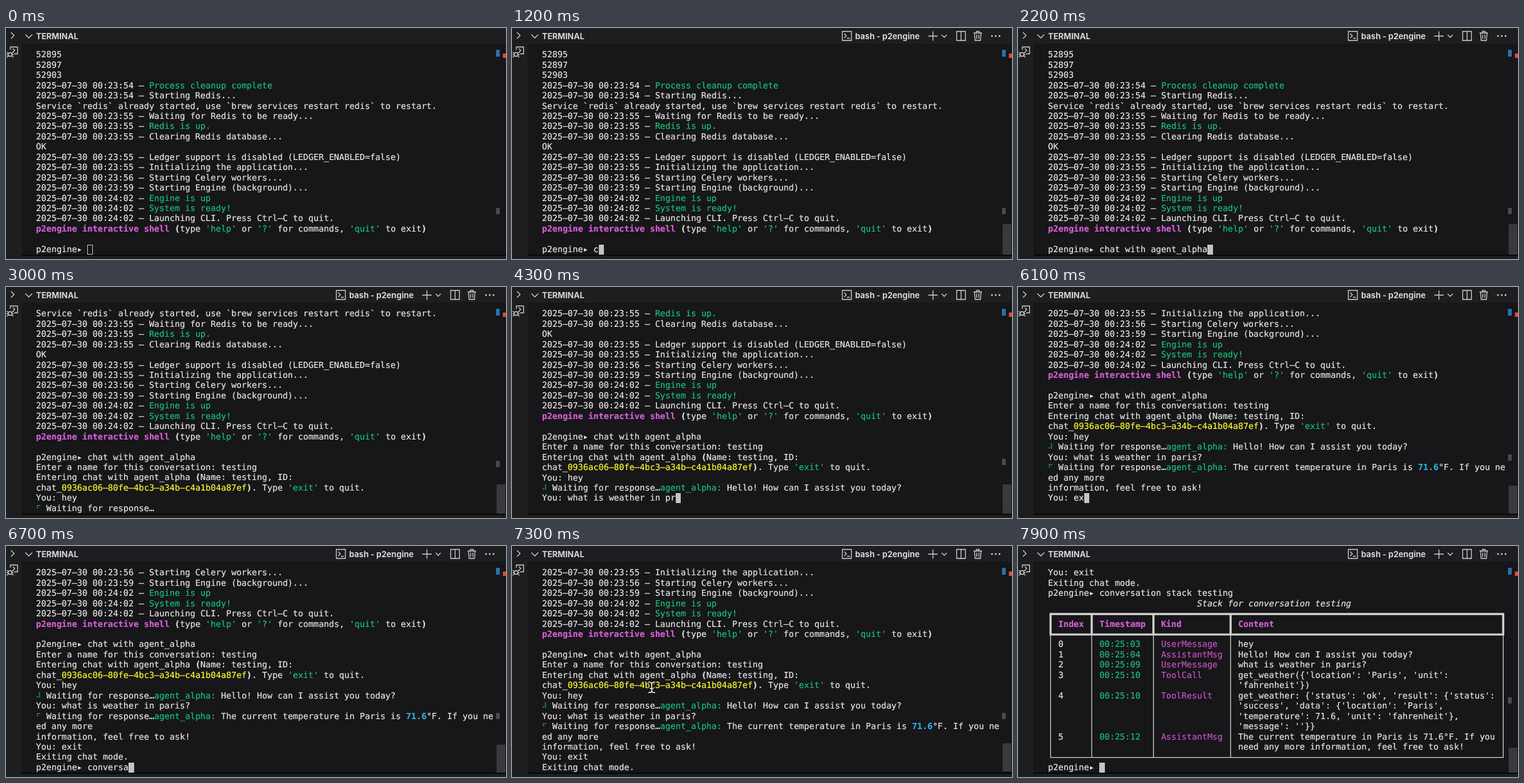
Write an HTML page that moves like this. It is 800x371 px and loops after 8000 ms.

```html
<!DOCTYPE html>
<html lang="en">
<head>
<meta charset="utf-8">
<title>Terminal session</title>
<style>
html, body { margin: 0; width: 100%; height: 100%; overflow: hidden; background: #1e1d1f; }
#stage { position: relative; width: 800px; height: 371px; overflow: hidden; background: #1e1d1f; }
#stage > * { position: absolute; }
#pane { left: 25px; top: 25px; width: 775px; height: 339px; background: #171618; }
#foot { left: 25px; top: 364px; width: 775px; height: 2px; background: #080808; }
#chrome { left: 0; top: 0; }
.label { top: 3px; height: 20px; white-space: pre; color: #d6d6d6;
  font: 700 13px/20px Inter, "Open Sans", sans-serif; }
#view { left: 0; top: 35.3px; width: 784px; height: 329px; overflow: hidden; }
#text { position: absolute; left: 48px; top: 0; color: #e6e6e6;
  font: 13.67px/16.45px "DejaVu Sans Mono", "Liberation Mono", monospace;
  text-rendering: geometricPrecision; font-variant-ligatures: none; -webkit-text-stroke: .2px; }
#text > * { position: absolute; left: 0; white-space: pre; }
.g { color: #16c07a; }
.m { color: #c64fc6; }
.y { color: #fafa2c; }
.c { color: #2bb0dc; font-weight: 700; }
b.m { color: #d45fd6; }
.spin { position: absolute; left: 0; top: 0; font: 11px/16.45px "DejaVu Sans", sans-serif; color: #16c07a; }
#cursor { box-sizing: border-box; width: 8.4px; height: 16px; border: 1px solid #c4c4c4; }
#thumb { left: 785px; width: 14px; background: #3a393b; }
.mark { left: 784px; width: 6px; }
</style>
</head>
<body>
<div id="stage">
  <div id="pane"></div>
  <div id="foot"></div>
  <svg id="chrome" width="800" height="50" fill="none" stroke="#cfcfcf" stroke-width="1.3">
    <path d="M8 7l5 5-5 5M31 10.5l5.500 5.500 5.500-5.500"/>
    <path d="M7 35V30.500H18.500V41.500H13M11 33l3 3-3 3"/>
    <circle cx="6.500" cy="42.500" r="3"/>
    <path d="M1 39l3 2M1 43h2.500M1 47l3-2M12 39l-3 2M12 43H9.500M12 47l-3-2"/>
    <g id="tools">
      <path d="M528.500 5.500h14.500v14.500h-14.500zM531.500 9l3.500 3.500-3.500 3.500M536 16.500h4.500"/>
      <path d="M673.500 5.500v15M666 13h15M687.500 11l4 4 4-4"/>
      <path d="M711.500 5.500h14v14.500h-14zM718.500 5.500v14.500"/>
      <path d="M738.500 8h13.500M743 8V5.500h4.500V8M740 8l1 12h8.500l1-12M743.500 10.500v7M747 10.500v7"/>
      <g fill="#cfcfcf" stroke="none"><circle cx="768" cy="13" r="1.400"/><circle cx="774" cy="13" r="1.400"/><circle cx="780" cy="13" r="1.400"/></g>
    </g>
  </svg>
  <div class="label" style="left:48px">TERMINAL</div>
  <div class="label" id="shell" style="left:549px">bash - p2engine</div>
  <div id="view"><div id="text"></div></div>
  <div id="thumb"></div>
  <div class="mark" style="top:35px;height:11px;background:#2274ae"></div>
  <div class="mark" id="mark" style="height:10px;background:#4b4a4c"></div>
  <div style="left:795px;top:41px;width:5px;height:7px;background:#e2483c"></div>
  <svg id="mouse" style="left:216px;top:216px" width="15" height="22" fill="none" stroke-linecap="round">
    <defs><path id="beam" d="M2.500 2.500q5 0 5 3v11q0 3-5 3M12.500 2.500q-5 0-5 3v11q0 3 5 3M5 13h5"/></defs>
    <use href="#beam" stroke="#111" stroke-width="3.600"/>
    <use href="#beam" stroke="#ececec" stroke-width="1.700"/>
  </svg>
</div>
<script>
const LOOP = 8000, ROW = 16.45, COL = 8.23, ROWS = 20, VIEW = ROWS * ROW;
const HISTORY = 114, MARK_LINE = 105.4;
const $ = id => document.getElementById(id);
const tag = (cls, s, el = 'span') => `<${el} class="${cls}">${s}</${el}>`;
const g = s => tag('g', s), m = s => tag('m', s), mb = s => tag('m', s, 'b');
const log = (time, s) => `2025-07-30 00:${time} - ${s}`;
const PROMPT = 'p2engine▸ ';

const lines = [];
const put = (at, ...list) => list.forEach(html => lines.push({ at, html }));
// keys: [start, ms per key, text already there, text being typed]
const input = (at, until, html, ...keys) => lines.push({ at, until, html, keys });
const wait = (at, done, phase, reply) => lines.push({ at, done, phase, reply });

put(0, '52895', '52897', '52903',
  log('23:54', g('Process cleanup complete')),
  log('23:54', 'Starting Redis...'),
  'Service `redis` already started, use `brew services restart redis` to restart.',
  log('23:55', 'Waiting for Redis to be ready...'),
  log('23:55', g('Redis is up.')),
  log('23:55', 'Clearing Redis database...'),
  'OK',
  log('23:55', 'Ledger support is disabled (LEDGER_ENABLED=false)'),
  log('23:55', 'Initializing the application...'),
  log('23:56', 'Starting Celery workers...'),
  log('23:59', 'Starting Engine (background)...'),
  log('24:02', g('Engine is up')),
  log('24:02', g('System is ready!')),
  log('24:02', 'Launching CLI. Press Ctrl-C to quit.'),
  `${mb('p2engine interactive shell')} <b>(</b>type ${g("'help'")} or ${g("'?'")} for commands, ${g("'quit'")} to exit<b>)</b>`,
  '');
input(0, 2300, PROMPT, [1200, 45, '', 'chat with agent_alpha']);
input(2300, 2660, 'Enter a name for this conversation: ', [2360, 40, '', 'testing']);
put(2660, 'Entering chat with agent_alpha <b>(</b>Name: testing, ID:',
  `chat_${tag('y', '0936ac06-80fe-4bc3-a34b-c4a1b04a87ef')}<b>)</b>. Type ${g("'exit'")} to quit.`);
input(2660, 2880, 'You: ', [2720, 50, '', 'hey']);
wait(2880, 3120, 3000, 'Hello! How can I assist you today?');
input(3120, 4600, 'You: ',
  [3170, 54, '', 'what is weather in pr'],
  [4340, 40, 'what is weather in p', ''],
  [4380, 38, 'what is weather in p', 'aris?']);
wait(4600, 5400, 5400, `The current temperature in Paris is ${tag('c', '71.6')}°F. If you ne`);
put(5400, 'ed any more', 'information, feel free to ask!');
input(5400, 6260, 'You: ', [6060, 35, '', 'exit']);
put(6260, 'Exiting chat mode.');
input(6260, 7850, PROMPT,
  [6420, 38, '', 'conversation stack'],
  [7450, 40, 'conversation stack', ' testing']);

const cells = (i, time, kind, content) =>
  '  ' + i.padEnd(8) + g(time.padEnd(12)) + m(kind.padEnd(15)) + content;
const more = s => ' '.repeat(37) + s;
put(7850, ' '.repeat(29) + '<i>Stack for conversation testing</i>');
const tableLine = lines.length;
put(7850, '',
  mb('  Index   Timestamp   Kind           Content'),
  '',
  cells('0', '00:25:03', 'UserMessage', 'hey'),
  cells('1', '00:25:04', 'AssistantMsg', 'Hello! How can I assist you today?'),
  cells('2', '00:25:09', 'UserMessage', 'what is weather in paris?'),
  cells('3', '00:25:10', 'ToolCall', "get_weather({'location': 'Paris', 'unit':"),
  more("'fahrenheit'})"),
  cells('4', '00:25:10', 'ToolResult', "get_weather: {'status': 'ok', 'result': {'status':"),
  more("'success', 'data': {'location': 'Paris',"),
  more("'temperature': 71.6, 'unit': 'fahrenheit'},"),
  more("'message': ''}}"),
  cells('5', '00:25:12', 'AssistantMsg', 'The current temperature in Paris is 71.6°F. If you'),
  more('need any more information, feel free to ask!'),
  '');
input(7850, LOOP, PROMPT);

// Line at the top of the pane when scrolled fully down
const SCROLL = [[0, 0], [2300, 1], [2660, 5], [3120, 7], [5400, 11], [6260, 12], [7850, 29]];
const between = (t, a, b) => t >= a && t < b;
const SPIN = '⠋⠙⠹⠸⠼⠴⠦⠧⠇⠏';

const text = $('text');
lines.forEach((line, i) => {
  line.el = document.createElement('div');
  line.el.style.top = i * ROW + 'px';
  text.append(line.el);
});

// Table frame: heavy header box, light body
const mid = ROW / 2, xs = [0, 8, 20, 35, 88].map(c => (c + .5) * COL);
const head = mid + 2 * ROW, base = mid + 14 * ROW;
const bars = (y1, y2) => xs.map(x => `M${x} ${y1}V${y2}`).join('');
const rule = y => `M${xs[0]} ${y}H${xs[4]}`;
text.insertAdjacentHTML('beforeend',
  `<svg id="table" width="740" height="250" fill="none" stroke="#cfcfcf" stroke-linecap="square" style="top:${tableLine * ROW}px">
  <path stroke-width="3.4" d="${bars(mid, head)}${rule(mid)}${rule(head)}"/>
  <path stroke-width="1.3" d="${bars(head, base)}${rule(base)}"/></svg><div id="cursor"></div>`);

const typed = (keys, t) => {
  const k = keys.filter(k => t >= k[0]).pop();
  return k ? k[2] + k[3].slice(0, Math.floor((t - k[0]) / k[1]) + 1) : '';
};

function content(line, t) {
  if (line.keys) return line.html + typed(line.keys, t);
  // The terminal face has wide hyphens
  if (!line.done) return line.html.replace(/-/g, '–');
  const step = Math.floor((Math.min(t, line.done) - line.phase) / 30);
  const glyph = SPIN[(step % 10 + 10) % 10];
  const reply = t >= line.done ? `${g('agent_alpha:')} ${line.reply}` : '';
  return `${tag('spin', glyph)}  Waiting for response…${reply}`;
}

const show = (el, on) => { el.style.visibility = on ? 'visible' : 'hidden'; };

function draw(t) {
  const newest = SCROLL.filter(s => t >= s[0]).pop()[1];
  const top = newest - (between(t, 7200, 7430) ? 1 : 0);
  const focused = t >= 1000;
  text.style.top = -top * ROW + 'px';

  let active = -1;
  lines.forEach((line, i) => {
    const on = t >= line.at;
    show(line.el, on);
    if (!on) return;
    const html = content(line, t);
    if (line.last !== html) line.el.innerHTML = line.last = html;
    if (line.keys && t < line.until) active = i;
  });
  show($('table'), t >= 7850);

  const cursor = $('cursor');
  show(cursor, active >= 0);
  if (active >= 0) {
    cursor.style.left = content(lines[active], t).length * COL + 'px';
    cursor.style.top = active * ROW + 'px';
    cursor.style.background = focused ? '#c4c4c4' : 'none';
  }

  const scale = VIEW / (HISTORY + ROWS + newest);
  const thumb = $('thumb');
  thumb.style.top = 35 + (HISTORY + top) * scale + 'px';
  thumb.style.height = ROWS * scale + 'px';
  thumb.style.opacity = Math.max(0, Math.min(1, (t - 1000) / 100));
  $('mark').style.top = 30 + MARK_LINE * scale + 'px';

  show($('tools'), focused);
  show($('shell'), focused);
  show($('mouse'), between(t, 7100, 7600));
}

function tick() {
  draw(performance.now() % LOOP);
  requestAnimationFrame(tick);
}
tick();
</script>
</body>
</html>
```
